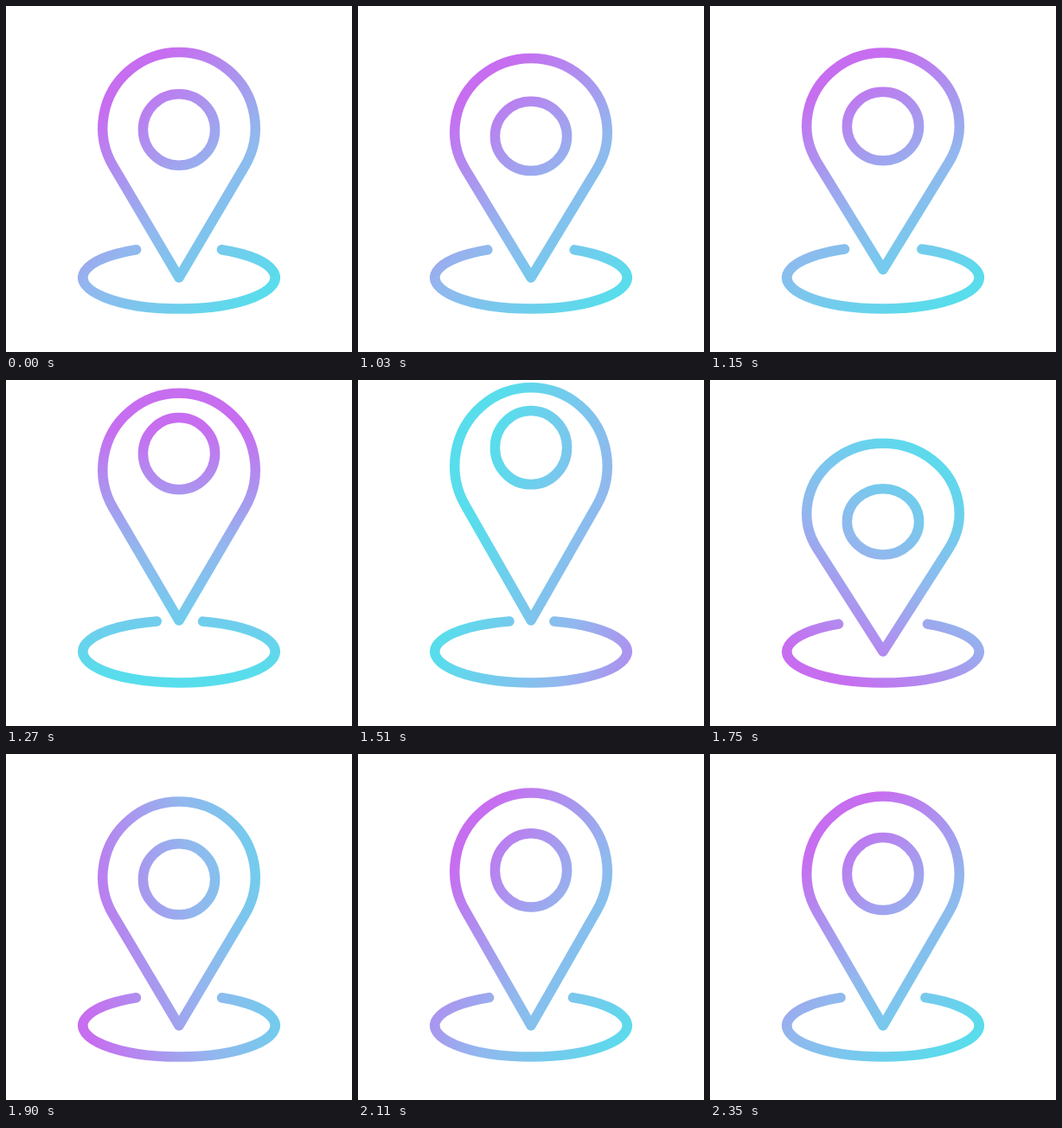
Animation of 400x400 px, one loop 2380 ms. Source, as an HTML page:

```html
<!DOCTYPE html>
<html lang="en">
<head>
<meta charset="utf-8">
<title>Map pin</title>
<style>
  html, body { margin: 0; width: 100%; height: 100%; overflow: hidden; background: #fff; }
  svg { display: block; width: 100%; height: 100%; }
</style>
</head>
<body>
<svg viewBox="0 0 400 400" fill="none" stroke="url(#tint)" stroke-width="11.5" stroke-linecap="round" stroke-linejoin="round">
  <defs>
    <linearGradient id="tint" gradientUnits="userSpaceOnUse">
      <stop offset="0" stop-color="#c76df0"/>
      <stop offset=".5" stop-color="#91b8ee"/>
      <stop offset="1" stop-color="#58ddec"/>
    </linearGradient>
  </defs>
  <path id="ring"/>
  <path id="pin"/>
  <ellipse id="eye" cx="200" rx="41.6"/>
</svg>
<script>
const LOOP = 2380, HOLD = 1030, STEP = 30, STEPS = 46;
const CX = 200, FLOOR = 314;

const el = id => document.getElementById(id);
const set = (node, attrs) => {
  for (const name in attrs) node.setAttribute(name, attrs[name]);
};
const ramp = (k, from, to) => Math.min(1, Math.max(0, (k - from) / (to - from)));

// Cubic bezier from 0 to 1 with flat ends; x1 and x2 are the handle positions
function bezier(x, x1, x2) {
  let lo = 0, hi = 1, s = .5;
  for (let i = 0; i < 24; i++) {
    const v = 1 - s;
    if (3 * v * v * s * x1 + 3 * v * s * s * x2 + s ** 3 < x) lo = s;
    else hi = s;
    s = (lo + hi) / 2;
  }
  return s * s * (3 - 2 * s);
}

// Stretch rises quickly then floats; squash starts slowly then snaps
const stretch = (k, from, to) => 1 - (1 - ramp(k, from, to)) ** 2.3;
const squash = (k, from, to) => ramp(k, from, to) ** 4.5;

function heightScale(k) {
  if (k < 2.3) k += STEPS;
  return .909
    + .118 * stretch(k, 2.3, 16) - .109 * squash(k, 17, 25)
    + .109 * stretch(k, 25, 39) - .118 * squash(k, 39, 48.3);
}

function jump(k) {
  const up = ramp(k, 3, 9);
  return 36 * up * up * (3 - 2 * up) * (1 - ramp(k, 17, 23) ** 2);
}

function drawPin(scale, lift) {
  const tip = FLOOR - lift, y = tip - 129.5 * scale;
  set(el('pin'), { d: `M${CX} ${tip}L124 ${y}A88.2 ${88 * scale} 0 1 1 276 ${y}Z` });
  set(el('eye'), { cy: tip - 171.5 - 273 * (scale - .996) - .55 * lift, ry: 41.5 * scale });
}

function drawRing(scale, lift) {
  const gap = 49.2 - 28 * (scale - 1);
  const point = dx => `${CX + dx} ${FLOOR - 36 * Math.sqrt(1 - (dx / 111.2) ** 2)}`;
  set(el('ring'), { d: `M${point(.65 * lift - gap)}A111.2 36 0 1 0 ${point(gap - .6 * lift)}` });
}

// The gradient turns once around a point right of the middle
function drawTint(k) {
  const a = (48 + 360 * bezier(k / STEPS, .36, .42)) * Math.PI / 180;
  const c = Math.cos(a), s = Math.sin(a);
  set(el('tint'), {
    x1: 246 - 162 * c, y1: 217 - 162 * s,
    x2: 246 + 123 * c, y2: 217 + 123 * s
  });
}

function draw(time) {
  const t = time % LOOP;
  const k = t < HOLD ? 0 : Math.floor((t - HOLD) / STEP) + 1;
  const scale = heightScale(k), lift = jump(k);
  drawPin(scale, lift);
  drawRing(scale, lift);
  drawTint(k);
}

const start = performance.now();
function tick() {
  draw(performance.now() - start);
  requestAnimationFrame(tick);
}
tick();
</script>
</body>
</html>
```
